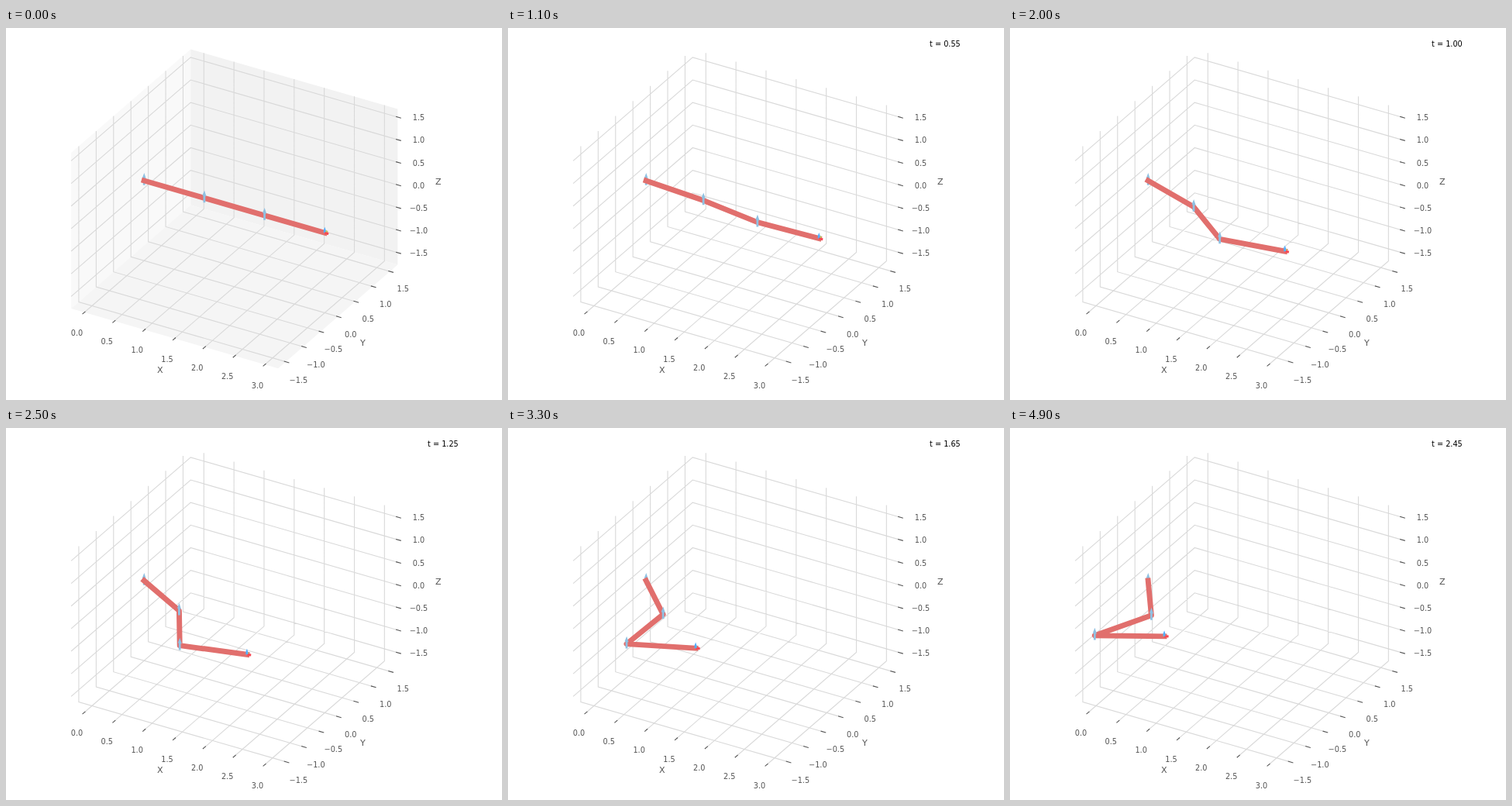
An HTML page that plays this animation: 640x480 px, repeating every 5 s.

```html
<!DOCTYPE html>
<html lang="en">
<head>
<meta charset="utf-8">
<title>Three-link arm</title>
<style>
  html, body { margin: 0; width: 100%; height: 100%; overflow: hidden; background: #fff; }
  svg { display: block; width: 640px; height: 480px; }
  path { fill: none; }
  text { font: 9.72px "DejaVu Sans", sans-serif; fill: #555; text-anchor: middle; }
  .name { font-size: 11.11px; }
  #clock { fill: #000; text-anchor: start; white-space: pre; }
  #grid { stroke: #d9d9d9; stroke-width: 1.11; }
  #ticks { stroke: #555; stroke-width: 1.11; }
  #arm { stroke: #e16f6d; stroke-width: 6.94; stroke-linecap: square; stroke-linejoin: round; }
  .arrow { stroke-width: 2.78; }
  .joint { stroke: #8fc1e2; }
</style>
</head>
<body>
<svg viewBox="0 0 640 480">
  <g id="panes"></g>
  <path id="grid"/>
  <path id="ticks"/>
  <g id="labels"></g>
  <path id="base" class="arrow joint"/>
  <path id="arm"/>
  <path id="joints" class="arrow joint"/>
  <g id="tool">
    <path id="ey" class="arrow" stroke="#bada55"/>
    <path id="ex" class="arrow" stroke="#f84752"/>
    <path id="ez" class="arrow" stroke="#54aeff"/>
  </g>
  <text id="clock" x="544" y="24"></text>
</svg>
<script>
const $ = id => document.getElementById(id);
const NS = 'http://www.w3.org/2000/svg';

// Orthographic view, azimuth -60, elevation 30
const SCALE = 89.7, ZUNIT = 58.3, OX = 178.2, OY = 197;
const COS = Math.sqrt(3) / 2;
const project = ([x, y, z]) => [
  OX + SCALE * (COS * x + y / 2),
  OY + SCALE * (x / 4 - COS / 2 * y) - ZUNIT * z
];
const line = (...pts) =>
  'M' + pts.map(p => project(p).map(v => v.toFixed(2)).join(' ')).join('L');

// Box limits
const X0 = -.219, X1 = 3.219, Y0 = -1.719, Y1 = 1.719, Z0 = -1.77, Z1 = 1.68;

function add(parent, tag, attrs, text = '') {
  const el = document.createElementNS(NS, tag);
  for (const key in attrs) el.setAttribute(key, attrs[key]);
  el.textContent = text;
  $(parent).append(el);
}

function label(text, x, y, cls = '') {
  add('labels', 'text', { x, y: y + (cls ? 4 : 3.6), class: cls }, text);
}

function drawBox() {
  const pane = (color, ...pts) =>
    add('panes', 'path', { d: line(...pts) + 'Z', style: 'fill:' + color });
  pane('#f9f9f9', [X0, Y0, Z0], [X0, Y1, Z0], [X0, Y1, Z1], [X0, Y0, Z1]);
  pane('#f2f2f2', [X0, Y1, Z0], [X1, Y1, Z0], [X1, Y1, Z1], [X0, Y1, Z1]);
  pane('#f5f5f5', [X0, Y0, Z0], [X1, Y0, Z0], [X1, Y1, Z0], [X0, Y1, Z0]);

  const IN = .029, OUT = .057;
  const num = v => v.toFixed(1).replace('-', '\u2212');
  let grid = '', ticks = '';
  for (let i = 0; i < 7; i++) {
    const x = i / 2, v = x - 1.5;
    grid += line([x, Y0, Z0], [x, Y1, Z0], [x, Y1, Z1]) +
            line([X1, v, Z0], [X0, v, Z0], [X0, v, Z1]) +
            line([X0, Y0, v], [X0, Y1, v], [X1, Y1, v]);
    ticks += line([x, Y0 - OUT, Z0], [x, Y0 + IN, Z0]) +
             line([X1 - IN, v, Z0], [X1 + OUT, v, Z0]) +
             line([X1 - IN, Y1, v], [X1 + OUT, Y1, v]);
    label(num(x), 91.5 + 38.83 * i, 393 + 11.33 * i);
    label(num(v), 377.3 + 22.5 * i, 454 - 19.6 * i);
    label(num(v), 532.5, 290.8 - 29.2 * i);
  }
  $('grid').setAttribute('d', grid);
  $('ticks').setAttribute('d', ticks);
  label('X', 198.7, 441.3, 'name');
  label('Y', 460.5, 406.3, 'name');
  label('Z', 557.7, 198.3, 'name');
}

const sum = (a, b, k = 1) => a.map((v, i) => v + k * b[i]);

// Shaft from p along v, with two barbs turned 15 degrees in the plane of v and side
function arrow(p, v, side) {
  const tip = sum(p, v);
  const back = sum(tip, v, -.3 * Math.cos(Math.PI / 12));
  const w = .3 * Math.sin(Math.PI / 12);
  return line(p, tip) + line(sum(back, side, w), tip, sum(back, side, -w));
}

const jointArrow = p => arrow(sum(p, [0, 0, -.1]), [0, 0, .2], [.2, 0, 0]);

const GOAL = [-1, -1, 2.5], STEPS = 50, TOOL = .06;
const ease = s => s ** 3 * (10 - 15 * s + 6 * s * s);

function pose(k) {
  const s = ease(k / (STEPS - 1));
  const pts = [[0, 0, 0]];
  let a = 0;
  for (const q of GOAL) {
    a += q * s;
    pts.push(sum(pts[pts.length - 1], [Math.cos(a), Math.sin(a), 0]));
  }
  $('arm').setAttribute('d', line(...pts));
  $('base').setAttribute('d', jointArrow(pts[0]));
  $('joints').setAttribute('d', jointArrow(pts[1]) + jointArrow(pts[2]));

  const end = pts[3], c = TOOL * Math.cos(a), d = TOOL * Math.sin(a), up = [0, 0, TOOL];
  $('ex').setAttribute('d', arrow(end, [c, d, 0], up));
  $('ey').setAttribute('d', arrow(end, [-d, c, 0], up));
  $('ez').setAttribute('d', arrow(end, up, [TOOL, 0, 0]));
  // The axis nearer to the viewer goes on top
  const xNear = COS * Math.cos(a + Math.PI / 3) > .375;
  $('tool').append($(xNear ? 'ex' : 'ez'));

  $('panes').style.display = k ? 'none' : '';
  $('clock').textContent = k ? 't = ' + (k * .05).toFixed(2) : '';
}

let shown = -1;
const start = performance.now();
function tick() {
  const k = Math.floor((performance.now() - start) / 100) % STEPS;
  if (k !== shown) pose(shown = k);
  requestAnimationFrame(tick);
}

drawBox();
tick();
</script>
</body>
</html>
```
